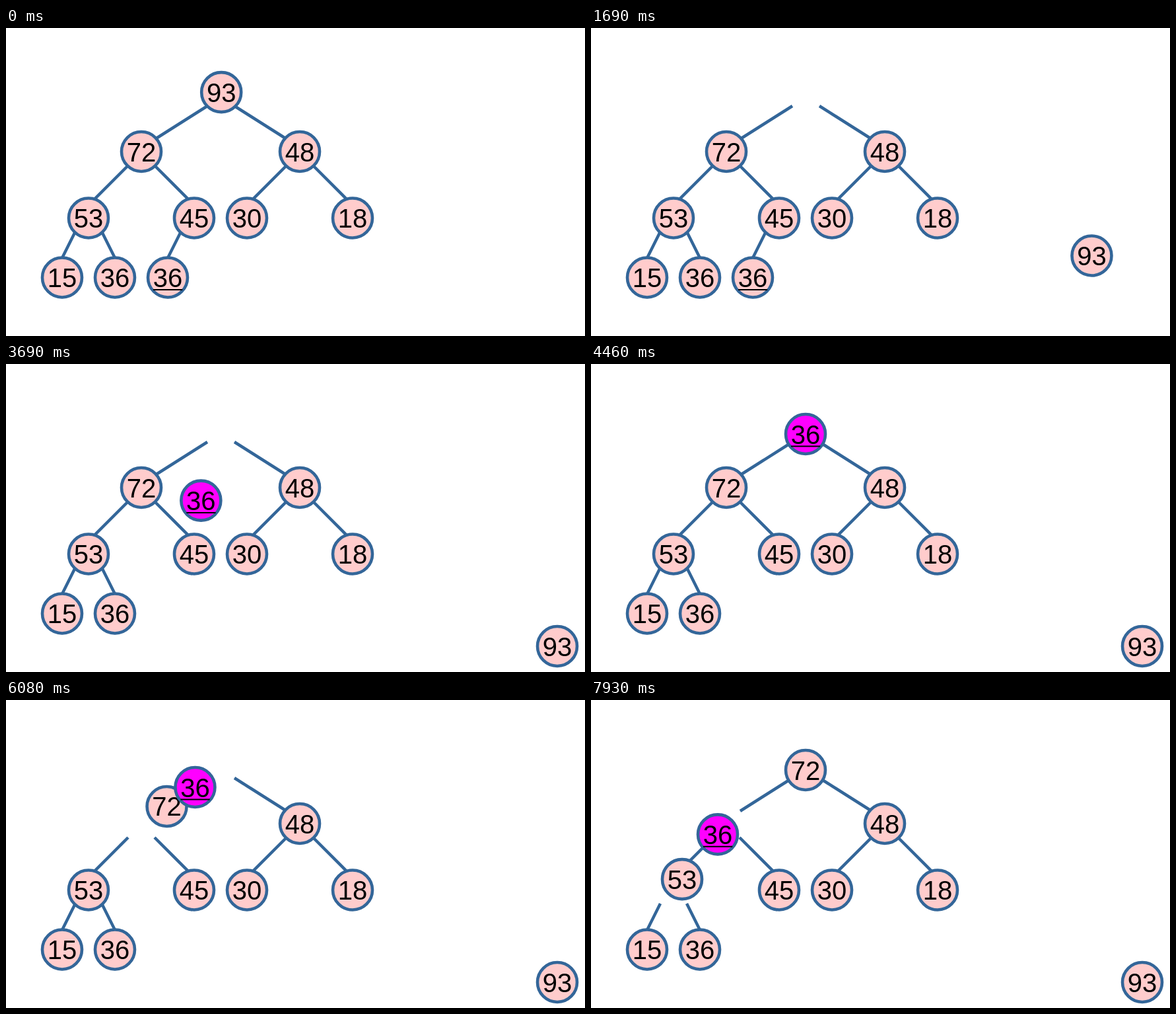
Recreate the animation shown at these times as an HTML page. Size 877 by 466 pixels, loop 8 s.

```html
<!DOCTYPE html>
<html>
<head>
<meta charset="utf-8">
<title>Heap: remove the maximum</title>
<style>
html, body { margin: 0; width: 100%; height: 100%; overflow: hidden; background: #fff; }
svg { display: block; }
circle { fill: #fcc; stroke: #369; stroke-width: 4.6; }
.edge { stroke: #369; stroke-width: 4.5; fill: none; }
.under { stroke: #000; stroke-width: 2; }
text { font: 40px "Liberation Sans", Arial, sans-serif; text-anchor: middle; }
</style>
</head>
<body>
<svg id="stage" width="877" height="466" viewBox="0 0 877 466">
  <path class="edge" d="M305 118L226 168M346 118L425 168M185 208L133 260M225 208L277 260
    M425 208L373 260M465 208L517 260M105 308L85 348M145 308L165 348"/>
  <path class="edge" id="lastEdge" d="M265 308L245 348"/>
</svg>
<script>
const LOOP = 8000, MOVE = 1760;
const stage = document.getElementById('stage');
const lastEdge = document.getElementById('lastEdge');

function add(parent, tag, attrs) {
  const el = document.createElementNS('http://www.w3.org/2000/svg', tag);
  for (const k in attrs) el.setAttribute(k, attrs[k]);
  return parent.appendChild(el);
}

function node(label, [x, y], underlined) {
  const g = add(stage, 'g', { transform: `translate(${x} ${y})` });
  add(g, 'circle', { r: 30 });
  add(g, 'text', { y: 14.5 }).textContent = label;
  if (underlined) add(g, 'path', { class: 'under', d: 'M-22 18.5H22.2' });
  return g;
}

const root = [325, 106], left = [205, 187], leftLeft = [125, 287.5], last = [245, 377.5];
node(48, [445, 187]);
node(45, [285, 287.5]);
node(30, [365, 287.5]);
node(18, [525, 287.5]);
node(15, [85, 377.5]);
node(36, [165, 377.5]);
const n53 = node(53, leftLeft);
const n72 = node(72, left);
const n93 = node(93, root);
const n36 = node(36, last, true);
const disc = n36.querySelector('circle');

const exitPath = document.createElementNS('http://www.w3.org/2000/svg', 'path');
exitPath.setAttribute('d', 'M325 106C348 -75 416 -25 566 137L835 427');
const exitLength = exitPath.getTotalLength();

const clamp = u => Math.min(1, Math.max(0, u));
function ease(t, start, duration) {
  const u = clamp((t - start) / duration);
  return u < .5 ? 2 * u * u : 1 - 2 * (1 - u) ** 2;
}

// Each stop is [start time, destination].
function travel(t, from, stops) {
  let [x, y] = from;
  for (const [start, to] of stops) {
    const p = ease(t, start, MOVE);
    x += (to[0] - x) * p;
    y += (to[1] - y) * p;
  }
  return [x, y];
}

function place(g, [x, y]) {
  g.setAttribute('transform', `translate(${x.toFixed(2)} ${y.toFixed(2)})`);
}

// The picture advances about 6.5 times a second, with one pause.
function stepped(t) {
  if (t < 5300) return Math.min(4460, Math.floor((t + 5) / 153.85) * 153.85);
  return 5300 + Math.floor((t - 5298) / 154.7) * 154.7;
}

function draw(now) {
  const t = stepped(now % LOOP);
  const out = exitPath.getPointAtLength(exitLength * ease(t, -197, 2588));
  place(n93, [out.x, out.y]);
  place(n36, travel(t, last, [[2690, root], [5368, left], [7428, leftLeft]]));
  place(n72, travel(t, left, [[5368, root]]));
  place(n53, travel(t, leftLeft, [[7428, left]]));

  const c = clamp((t - 2391) / 757);
  disc.style.fill = `rgb(255, ${204 - 204 * c}, ${204 + 51 * c})`;
  lastEdge.style.display = t > 2391 ? 'none' : '';
}

const began = performance.now();
function tick() {
  draw(performance.now() - began);
  requestAnimationFrame(tick);
}
tick();
</script>
</body>
</html>
```
